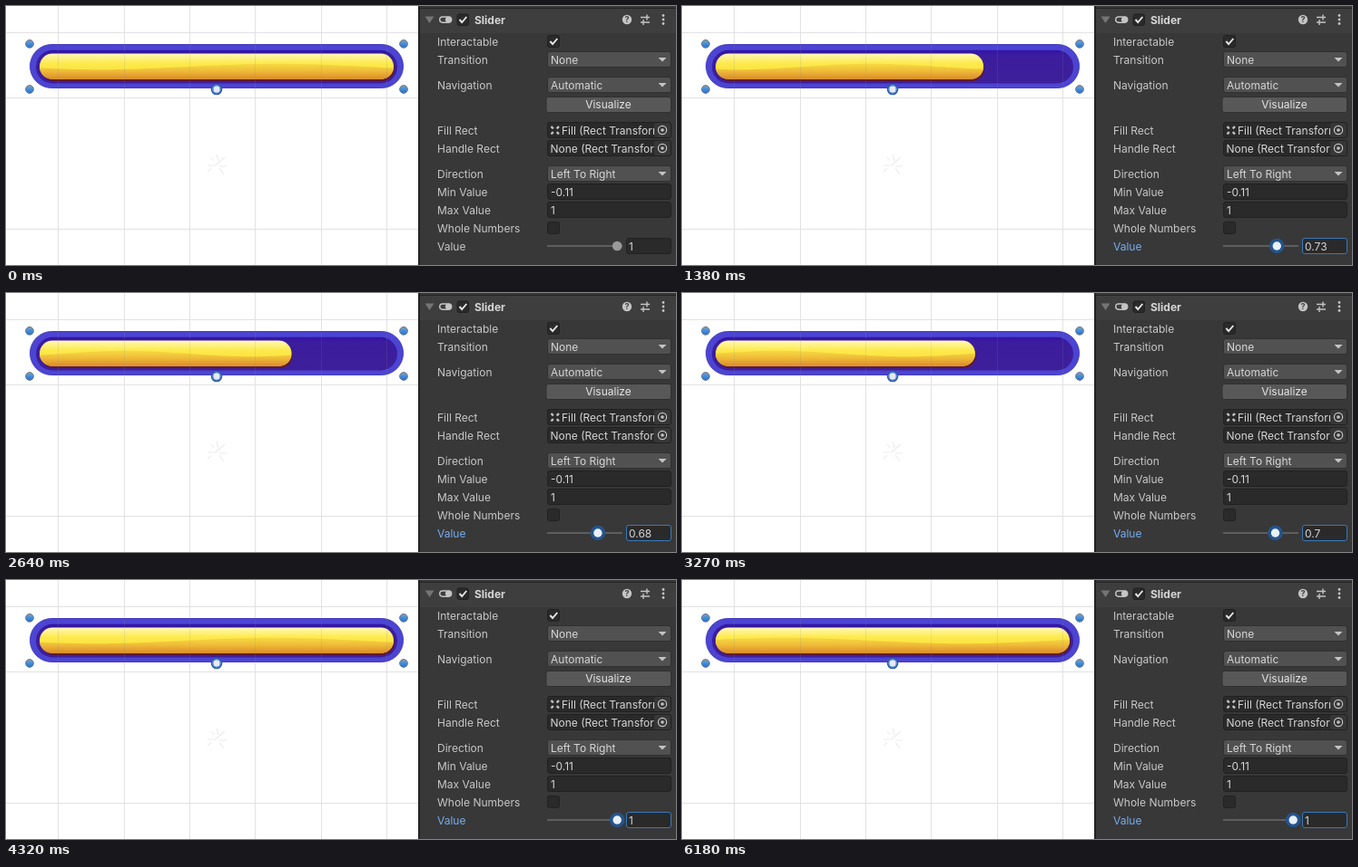
These frames come from a looping animation (738 by 286 pixels, 6.21 s). An HTML page:

```html
<!DOCTYPE html>
<html lang="en">
<head>
<meta charset="utf-8">
<title>Slider</title>
<style>
html, body { margin: 0; width: 100%; height: 100%; overflow: hidden; background: #fff; }
svg { display: block; width: 738px; height: 286px; }
text { font: 12px Inter, Roboto, sans-serif; fill: #c8c8c8; white-space: pre; }
.value { fill: #d6d6d6; }
.mid { text-anchor: middle; fill: #e4e4e4; }
.title { font-weight: 700; fill: #d6d6d6; }
.field { fill: #2a2a2a; stroke: #212121; }
.drop { fill: #515151; stroke: #303030; }
.icon { fill: none; stroke: #c4c4c4; stroke-width: 1.4; }
.solid { fill: #c4c4c4; }
.check { fill: none; stroke: #e6e6e6; stroke-width: 1.9; }
.halo { fill: #24548c; visibility: hidden; }
.knob { fill: #999; r: 5.3px; }
.focus .halo { visibility: visible; }
.focus .knob { fill: #e9f0f7; r: 4.7px; }
.focus #valueLabel { fill: #75adf0; }
.focus #valueBox { stroke: #3a79bb; }
</style>
</head>
<body>
<svg id="stage" viewBox="0 0 738 286">
  <defs>
    <linearGradient id="top" gradientUnits="userSpaceOnUse" x1="0" y1="52" x2="0" y2="72">
      <stop offset="0" stop-color="#fff8c0"/><stop offset=".22" stop-color="#fff391"/>
      <stop offset=".55" stop-color="#fdea4e"/><stop offset="1" stop-color="#fae33c"/>
    </linearGradient>
    <linearGradient id="low" gradientUnits="userSpaceOnUse" x1="0" y1="63" x2="0" y2="82">
      <stop offset="0" stop-color="#f7dc42"/><stop offset=".45" stop-color="#efbd38"/>
      <stop offset="1" stop-color="#d98328"/>
    </linearGradient>
    <linearGradient id="well" x1="0" y1="0" x2="0" y2="1">
      <stop offset="0" stop-color="#3313a6"/><stop offset=".15" stop-color="#3b1d9d"/>
      <stop offset="1" stop-color="#3e1f9a"/>
    </linearGradient>
    <linearGradient id="dot" x1="0" y1="0" x2="0" y2="1">
      <stop offset="0" stop-color="#8d9cab"/><stop offset=".4" stop-color="#4a92dc"/>
      <stop offset="1" stop-color="#2270cf"/>
    </linearGradient>
    <clipPath id="fillClip"><rect id="fillShape" x="37" y="52.5" width="390" height="28.3" rx="14.1"/></clipPath>
    <clipPath id="nameClip"><rect x="597" y="129" width="117" height="37"/></clipPath>
  </defs>

  <rect width="455" height="286" fill="#fff"/>
  <path d="M0 29.5H454M0 101.5H454M0 246.5H454M57.5 0V286M130.5 0V286M202.5 0V286M274.5 0V286M347.5 0V286M419.5 0V286" stroke="#e2e2e2" fill="none"/>
  <path d="M222 183L226 179.500M230 176.500L241 167M226 167L229 171M235 179L240 186M232 164L234 171M222 176H229M235 177H243" fill="none" stroke="#ececec" stroke-width="1.2"/>

  <rect x="26.5" y="42.5" width="411" height="48" rx="24" fill="#4c44d2" stroke="#443cbe"/>
  <rect x="33" y="48.8" width="398" height="36.7" rx="18.3" fill="url(#well)"/>
  <rect id="shade" x="39" y="55" width="389" height="28" rx="14" fill="#5f1a34"/>
  <g clip-path="url(#fillClip)">
    <rect x="36" y="51" width="393" height="32" fill="url(#top)"/>
    <path id="wave" fill="url(#low)"/>
  </g>
  <path d="M57.5 42V91M130.5 42V91M202.5 42V91M274.5 42V91M347.5 42V91M419.5 42V91" stroke="#888" stroke-opacity=".16"/>
  <g fill="url(#dot)" stroke="#6f7a87">
    <circle cx="26" cy="41.8" r="4.4"/><circle cx="438" cy="41.8" r="4.4"/>
    <circle cx="26" cy="92" r="4.4"/><circle cx="438" cy="92" r="4.4"/>
  </g>
  <circle cx="232" cy="92" r="5" fill="#e6eaf8" stroke="#2c5cab" stroke-width="2.6"/>
  <circle cx="232" cy="92" r="4.4" fill="none" stroke="#6fa3e4" stroke-width=".8"/>

  <rect x="454" width="284" height="286" fill="#383838"/>
  <rect x="454" y="3" width="284" height="27" fill="#3e3e3e"/>
  <path d="M454 2.500H738" stroke="#232323"/>
  <path d="M455 0V286" stroke="#232323" stroke-width="2"/>
  <path d="M461.5 11.5H471.5L466.5 19Z" fill="#747474"/>
  <rect x="477.7" y="12" width="13" height="6.2" rx="3.1" class="icon"/>
  <circle cx="487.3" cy="15.1" r="3.4" class="solid"/>
  <rect x="497" y="9" width="12.5" height="12.5" rx="2" class="field"/>
  <path class="check" d="M499.5 15L502.2 18L507.3 12"/>
  <text class="title" x="516" y="19.5">Slider</text>
  <circle cx="684" cy="15" r="5.2" class="solid"/>
  <text x="684" y="18.4" style="font-size:9px;font-weight:700;fill:#3e3e3e;text-anchor:middle">?</text>
  <path class="icon" d="M699 12.5H709M699 18H709M706 9.5V15.5M702 15V21"/>
  <g class="solid"><circle cx="724" cy="10.5" r="1.4"/><circle cx="724" cy="15" r="1.4"/><circle cx="724" cy="19.5" r="1.4"/></g>

  <g id="rows"></g>

  <path d="M596 265H679" stroke="#5e5e5e" stroke-width="2"/>
  <g id="handle">
    <circle class="halo" cy="265" r="8.3"/>
    <circle class="knob" cy="265" r="5.3"/>
  </g>
  <rect id="valueBox" class="field" x="683.5" y="256.5" width="49" height="17" rx="2.5"/>
  <text id="valueText" class="value" x="686" y="269.5">1</text>
</svg>
<script>
const LOOP = 6210, STEP = 30;
const FOCUS_AT = 930;
const $ = id => document.getElementById(id);

// Inspector rows
const label = (y, s, id = '') => `<text id="${id}" x="475" y="${y + 4.5}">${s}</text>`;
const box = (y, cls) => `<rect class="${cls}" x="596.5" y="${y - 8.5}" width="136" height="17" rx="2.5"/>`;
const value = (y, s, x = 600) => `<text class="value" x="${x}" y="${y + 4.5}">${s}</text>`;
const drop = (y, name, s) => label(y, name) + box(y, 'drop') + value(y, s) +
  `<path class="solid" d="M718.5 ${y - 2}h9l-4.5 4.5z"/>`;
const input = (y, name, s) => label(y, name) + box(y, 'field') + value(y, s);
const slot = (y, name, s, x = 599.5) => label(y, name) + box(y, 'field') +
  `<g clip-path="url(#nameClip)">${value(y, s, x)}</g>` +
  `<rect x="714" y="${y - 8}" width="18" height="16" rx="2" fill="#373737"/>` +
  `<circle class="icon" cx="723" cy="${y}" r="4.6" style="stroke-width:1.2"/><circle class="solid" cx="723" cy="${y}" r="1.8"/>`;
const toggle = (y, name, on) => label(y, name) +
  `<rect class="field" x="596.5" y="${y - 6.5}" width="13" height="13" rx="2"/>` +
  (on ? `<path class="check" d="M599.3 ${y}l2.8 3l5.2-6"/>` : '');

$('rows').innerHTML =
  toggle(39, 'Interactable', true) +
  drop(59, 'Transition', 'None') +
  drop(87, 'Navigation', 'Automatic') +
  '<rect x="595" y="100.5" width="137.5" height="17" rx="2.5" fill="#585858" stroke="#303030"/>' +
  '<text class="mid" x="663.5" y="113.3">Visualize</text>' +
  slot(137, 'Fill Rect', 'Fill (Rect Transform)', 612) +
  '<path class="icon" style="stroke-width:2.4" d="M600.5 133l2.3 2.3M609 133l-2.300 2.300M600.5 141.500l2.300-2.300M609 141.500l-2.300-2.300"/>' +
  slot(157, 'Handle Rect', 'None (Rect Transform)') +
  drop(185, 'Direction', 'Left To Right') +
  input(205, 'Min Value', '-0.11') +
  input(225, 'Max Value', '1') +
  toggle(245, 'Whole Numbers', false) +
  label(265, 'Value', 'valueLabel');

// [time, slider value]
const drag = [[0, 1], [930, 1], [1020, .98], [1380, .73], [1740, .52], [2100, .58],
  [2640, .68], [3240, .70], [3810, .77], [4020, 1], [LOOP, 1]];
// [time, wave crest in widths]
const drift = [[0, .67], [1020, 2], [2100, 3.75], [2640, 4.34], [3810, 6], [5100, 7.66], [LOOP, 9.24]];

function at(keys, t) {
  const i = Math.max(1, keys.findIndex(k => k[0] >= t));
  const [t0, a] = keys[i - 1], [t1, b] = keys[i];
  return a + (b - a) * (t - t0) / (t1 - t0);
}

// The wave repaints rarely until the drag begins.
const waveTime = t => t < 900 ? Math.min(660, Math.floor(t / 75) * 75) : t;

function wavePath(width, crest) {
  let d = 'M36 84';
  for (let i = 0; i <= 60; i++) {
    const u = i / 60;
    const y = 67 - 3.2 * Math.cos(2 * Math.PI * (u - crest));
    d += `L${(37 + u * width).toFixed(1)} ${y.toFixed(2)}`;
  }
  return d + 'V84Z';
}

function draw(now) {
  const t = Math.floor((now % LOOP) / STEP) * STEP;
  const v = at(drag, t), part = (v + .11) / 1.11;
  const width = 390 * part;
  $('fillShape').setAttribute('width', width);
  $('shade').setAttribute('width', width - 1);
  $('wave').setAttribute('d', wavePath(width, at(drift, waveTime(t))));
  $('handle').setAttribute('transform', `translate(${599.4 + 73.8 * part} 0)`);
  $('valueText').textContent = String(+v.toFixed(2));
  $('stage').classList.toggle('focus', t >= FOCUS_AT);
}

const start = performance.now();
(function tick() {
  draw(performance.now() - start);
  requestAnimationFrame(tick);
})();
</script>
</body>
</html>
```
